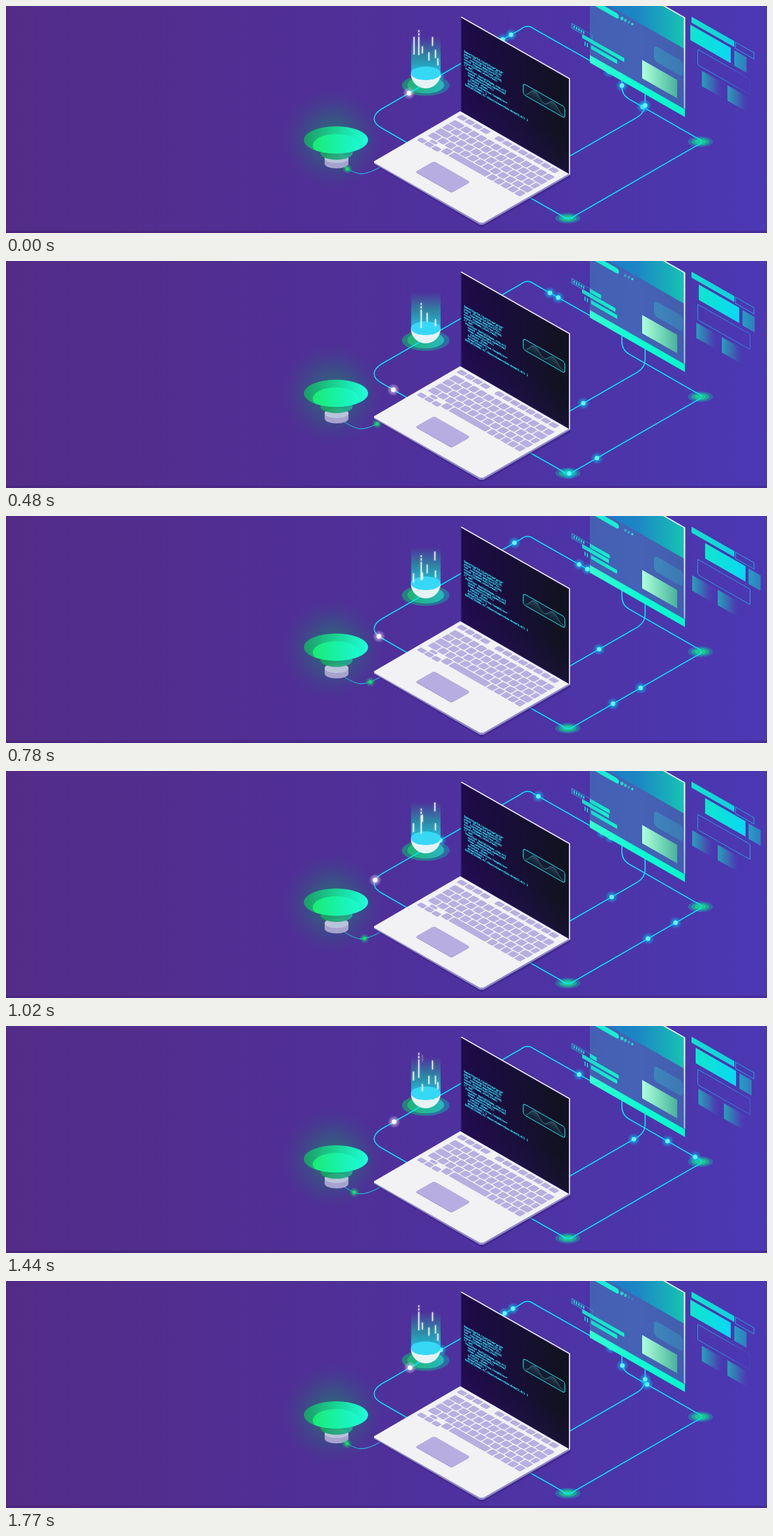
Animation of 1280 by 383 pixels, one loop 1800 ms. Source, as an HTML page with a canvas:

```html
<!DOCTYPE html>
<html lang="en">
<head>
<meta charset="utf-8">
<title>Isometric laptop</title>
<style>
  html, body { margin: 0; width: 100%; height: 100%; overflow: hidden; background: #4f309a; }
  canvas { display: block; width: 1280px; height: 383px; }
</style>
</head>
<body>
<canvas id="stage" width="1280" height="383"></canvas>
<script>
const ctx = document.getElementById('stage').getContext('2d');
const LOOP = 1800, STEP = 30, DRIFT = 1750, SLOPE = 0.573;

// ---- helpers ----
function gradient(x0, y0, x1, y1, ...colors) {
  const g = ctx.createLinearGradient(x0, y0, x1, y1);
  colors.forEach((c, i) => g.addColorStop(i / (colors.length - 1), c));
  return g;
}
function glow(x, y, r, ...colors) {
  const g = ctx.createRadialGradient(x, y, 0, x, y, r);
  colors.forEach((c, i) => g.addColorStop(i / (colors.length - 1), c));
  ctx.fillStyle = g;
  ctx.fillRect(x - r, y - r, 2 * r, 2 * r);
}
function ellipse(x, y, rx, ry, fill) {
  ctx.beginPath();
  ctx.ellipse(x, y, rx, ry, 0, 0, Math.PI * 2);
  ctx.fillStyle = fill;
  ctx.fill();
}
function polygon(fill, ...points) {
  ctx.beginPath();
  points.forEach(([x, y]) => ctx.lineTo(x, y));
  ctx.closePath();
  ctx.fillStyle = fill;
  ctx.fill();
}
function inPlane(matrix, draw) {
  ctx.save();
  ctx.transform(...matrix);
  draw();
  ctx.restore();
}
// Upright panel receding to the lower right; (x, y) is its top left corner.
function panel(x, y, w, h, { fill, stroke, r = 0, line = 1 }) {
  inPlane([1, SLOPE, 0, 1, x, y], () => {
    ctx.beginPath();
    ctx.roundRect(0, 0, w, h, r);
    if (fill) { ctx.fillStyle = Array.isArray(fill) ? gradient(0, 0, w, 0, ...fill) : fill; ctx.fill(); }
    if (stroke) {
      ctx.strokeStyle = Array.isArray(stroke) ? gradient(0, 0, w, 0, ...stroke) : stroke;
      ctx.lineWidth = line;
      ctx.stroke();
    }
  });
}

// ---- cables and the lights that run along them ----
function route(d) {
  const path = document.createElementNS('http://www.w3.org/2000/svg', 'path');
  path.setAttribute('d', d);
  return { shape: new Path2D(d), at: s => path.getPointAtLength(s) };
}
const main = route('M677 232L632 206C615 197 615 184 632 173.5L866 39Q877 30 888 38.5L1040 125');
const outer = route('M870 317L935 354Q945 363 956 354.5L1160 236.5Q1179 229 1160 221.5L1048 157Q1036 150 1036 136L1036 110');
const inner = route('M940 258L1063 187Q1075 179 1075 166L1075 130');
const wire = route('M632 270C616 280 606 283 597 283C588 283 579 278 568 271');

const CYAN = ['#62f4ff', '0,205,255'], WHITE = ['#ffffff', '240,220,255'], GREEN = ['#17d96c', '20,220,110'];
const lowLights = [
  { on: main, start: -15.5, speed: .0935, from: 0, to: 185, period: DRIFT, tint: WHITE },
  { on: main, start: 330, speed: .188, from: 195, to: 550, period: DRIFT, tint: CYAN },
  { on: main, start: 346, speed: .188, from: 195, to: 550, period: DRIFT, tint: CYAN },
  { on: main, start: 206, speed: .188, from: 195, to: 550, period: DRIFT, tint: CYAN },
  { on: wire, start: -11, speed: .042, from: 0, to: 69, period: DRIFT, tint: GREEN, size: 3 },
];
// These pass in front of the laptop's edge.
const highLights = [
  { on: outer, start: 6, speed: .283, from: 14, to: 535, period: LOOP, tint: CYAN },
  { on: outer, start: -47.5, speed: .283, from: 14, to: 535, period: LOOP, tint: CYAN },
  { on: inner, start: -13, speed: .102, from: 9, to: 200, period: DRIFT, tint: CYAN },
];
function drawLights(lights, t) {
  for (const { on, start, speed, from, to, period, tint, size = 3.8 } of lights) {
    for (const lap of [-1, 0, 1]) {
      const s = start + speed * (t + lap * period);
      if (s < from || s > to) continue;
      const p = on.at(s), [core, rgb] = tint;
      glow(p.x, p.y, size * 2.8, `rgba(${rgb},.9)`, `rgba(${rgb},.45)`, `rgba(${rgb},0)`);
      ellipse(p.x, p.y, size, size, core);
    }
  }
}
function drawCables() {
  ctx.strokeStyle = '#08e8ff';
  ctx.lineWidth = 1.7;
  [main, outer, inner].forEach(r => ctx.stroke(r.shape));
  ctx.strokeStyle = '#1fc4e4';
  ctx.lineWidth = 1.3;
  ctx.stroke(wire.shape);
}

// ---- scenery ----
function drawBackground() {
  ctx.fillStyle = gradient(0, 0, 1280, 0, '#532c87', '#4f309a', '#4b38b3');
  ctx.fillRect(0, 0, 1280, 383);
  ctx.fillStyle = 'rgba(60,30,110,.35)';
  ctx.fillRect(0, 379, 1280, 4);
}
function drawPad(x, y) {
  ellipse(x, y, 21, 9, 'rgba(35,150,175,.5)');
  ellipse(x, y, 15, 6.5, 'rgba(25,200,145,.6)');
  ellipse(x, y, 9.5, 4.2, 'rgba(25,225,135,.65)');
}
function drawHorn(sway) {
  const dy = 2.5 * sway - 2.5;
  glow(550, 224, 86, 'rgba(20,150,100,.7)', 'rgba(30,125,110,.36)', 'rgba(50,80,135,0)');
  ctx.beginPath();
  ctx.ellipse(556, 257, 20, 8, 0, Math.PI, 0);
  ctx.ellipse(556, 266, 20, 8, 0, 0, Math.PI);
  ctx.fillStyle = '#a6a3ce';
  ctx.fill();
  ellipse(556, 257, 20, 8, '#b9c3d9');
  ellipse(556, 248 + dy, 27, 11.5, gradient(529, 0, 583, 0, 'rgba(25,160,90,.95)', 'rgba(35,175,150,.9)'));
  ellipse(555, 226 + dy, 54, 23, gradient(501, 0, 609, 0, '#1c9c68', '#19d492', '#1effdc'));
  ctx.save();
  ctx.beginPath();
  ctx.ellipse(555, 226 + dy, 54, 23, 0, 0, Math.PI * 2);
  ctx.clip();
  ellipse(555, 235 + dy, 39, 19, gradient(516, 0, 594, 0, '#1bea74', '#18f2a2', 'rgba(28,255,215,.6)'));
  ctx.restore();
}

// x, length, start time, start y, end time, end y
const streaks = [
  [694, 42, 1290, 48, 2140, 38], [700, 12, 1400, 102, 2120, 52], [700, 12, 680, 106, 1500, 46],
  [686, 30, 1770, 53, 2200, 43], [685, 15, 700, 100, 1720, 72], [698, 42, 420, 72, 1330, 61],
  [708, 15, 190, 95, 1000, 79], [711, 14, 1400, 85, 2180, 74], [717, 15, 1360, 60, 2120, 49],
  [721, 15, 690, 63, 1310, 48], [722, 12, 440, 99, 1330, 85], [722, 14, 1380, 86, 2250, 66],
  [726, 12, 1380, 96, 2100, 85],
];
function drawStreaks(t) {
  ctx.fillStyle = '#fff';
  ctx.shadowColor = 'rgba(230,245,255,.8)';
  ctx.shadowBlur = 3;
  for (const [x, len, t0, y0, t1, y1] of streaks) {
    const now = t < t0 ? t + LOOP : t;
    if (now < t0 || now > t1) continue;
    const u = (now - t0) / (t1 - t0), y = y0 + (y1 - y0) * u * (3 - u) / 2;
    ctx.globalAlpha = Math.min(1, (now - t0) / 30, (t1 - now) / 250);
    if (len > 40) {
      ctx.fillRect(x - .4, y, 1.6, 3);
      ctx.fillRect(x - .4, y + 5, 1.6, 4);
      ctx.fillRect(x - .4, y + 11, 1.6, len - 11);
    } else ctx.fillRect(x - .4, y, 1.6, len);
  }
  ctx.globalAlpha = 1;
  ctx.shadowBlur = 0;
}
function drawBowlPad() {
  ellipse(706, 134, 40, 17.5, gradient(666, 0, 746, 0, 'rgba(30,150,120,.8)', 'rgba(40,120,170,.8)'));
  ellipse(706, 133.5, 31, 14, gradient(675, 0, 737, 0, '#20b472', '#28b8c0'));
}
function drawBowl(t) {
  ctx.beginPath();
  ctx.arc(706, 114, 25, 0, Math.PI);
  ctx.fillStyle = '#e6f3f5';
  ctx.fill();
  ctx.fillStyle = gradient(0, 52, 0, 115, 'rgba(40,150,165,0)', 'rgba(35,160,165,.75)', '#22c4e2');
  ctx.fillRect(681.5, 52, 49.5, 63);
  ellipse(706, 113.5, 25, 11.5, '#36d8f6');
  drawStreaks(t);
}

const code = [
  [0, 'import{grid,list}from"grid"'], [0, 'const_size=grid.make(12,8)'], [0, 'let_row=size.map(i=>i*2);'],
  [0, 'const_items=list(row,size)'], [0, 'export{items,size,row};'], [0, '//_set'],
  [1, 'function_build(items,row,n){'], [3, 'const_view=items.open(row)'], [3, 'view.each(i=>i+1);'],
  [5, 'return_view;'], [3, 'if(view.size>row.length)n++'], [3, 'draw(view); }'],
  [1, 'build(items,4).then(view=>view.draw(2,8)) }'],
].map(([indent, text]) => [indent, text.replaceAll('_', ' ')]);
function drawScreen() {
  polygon('#2a1a63', [765, 18], [948, 122], [948, 284], [765, 178]);
  polygon(gradient(768, 160, 948, 150, '#1f0a4b', '#170f36', '#10131c'), [767, 21], [946, 124], [946, 281], [767, 178]);
  polygon(gradient(800, 200, 830, 150, 'rgba(50,25,110,.22)', 'rgba(40,15,100,0)'), [767, 130], [946, 232], [946, 281], [767, 178]);
  ctx.strokeStyle = '#f3f1fb';
  ctx.lineWidth = 1.8;
  ctx.beginPath();
  ctx.moveTo(765.5, 18.5);
  ctx.lineTo(947.8, 122.5);
  ctx.lineTo(947.8, 284);
  ctx.stroke();

  inPlane([1, SLOPE, 0, 1, 766, 18], () => {
    ctx.font = 'bold 4.1px "DejaVu Sans Mono", monospace';
    ctx.fillStyle = ctx.strokeStyle = '#2ed3ea';
    ctx.lineWidth = .35;
    code.forEach(([indent, text], i) => {
      ctx.fillText(text, 4 + indent * 2.2, 57 + i * 4.6);
      ctx.strokeText(text, 4 + indent * 2.2, 57 + i * 4.6);
    });
    ctx.beginPath();
    ctx.roundRect(104, 53, 70, 18.5, 4);
    ctx.fillStyle = 'rgba(20,40,60,.5)';
    ctx.fill();
    ctx.strokeStyle = '#22e0e6';
    ctx.lineWidth = 1.2;
    ctx.stroke();
    ctx.beginPath();
    ctx.moveTo(108, 68.5);
    ctx.bezierCurveTo(115, 68, 116, 55, 123, 55);
    ctx.bezierCurveTo(130, 55, 132, 67, 140, 66.5);
    ctx.bezierCurveTo(146, 66, 147, 56, 154, 56);
    ctx.bezierCurveTo(161, 56, 163, 68, 171, 68.5);
    ctx.fillStyle = gradient(0, 54, 0, 69, 'rgba(55,100,120,.75)', 'rgba(25,45,60,.3)');
    ctx.fill();
    ctx.strokeStyle = '#427f90';
    ctx.lineWidth = .8;
    ctx.stroke();
  });
}
function drawBase() {
  polygon('rgba(45,25,110,.35)', [619, 268], [800, 374], [950, 289], [948, 280]);
  polygon('#8f88c9', [619, 263], [619, 266], [797, 369], [803, 369], [949, 285], [948, 280]);
  polygon('#f2f2f4', [619, 262], [763, 178], [768, 177], [948, 281], [947, 283], [803, 365.5], [797, 365.5], [619, 264]);

  // Keyboard plane: first axis along the hinge, second towards the user.
  inPlane([1, SLOPE, -1, SLOPE, 766, 177], () => {
    ctx.fillStyle = '#b8afe1';
    ctx.beginPath();
    const key = (u, v, w, h) => ctx.roundRect(u, v, w, h, 1.6);
    for (let i = 0; i < 13; i++) if (i !== 4) key(5 + i * 13 - (i > 4 ? 2 : 0), 5.5, 11.4, 8);
    for (let row = 0; row < 4; row++) {
      const v = 18.6 + row * 12, first = [17, 12, 20, 14][row];
      key(8, v, first, 10.5);
      for (let u = 8 + first + 1.6; u < 174;) {
        const w = u > 156 ? 176 - u : 11;
        key(u, v, w, 10.5);
        u += w + 1.6;
      }
    }
    key(42, 66.6, 11, 10.5);
    key(55, 66.6, 62, 10.5);
    for (let i = 0; i < 5; i++) key(119 + i * 11.6, 66.6, 10, 10.5);
    for (let i = 0; i < 3; i++) key(5 + i * 12.2, 73, 10.6, 7.5);
    key(17.2, 66.6, 10.6, 5);
    ctx.fill();
    ctx.beginPath();
    ctx.roundRect(51.4, 98, 61, 31, 3);
    ctx.fillStyle = '#9f95d3';
    ctx.fill();
    ctx.beginPath();
    ctx.roundRect(51, 97, 61, 31, 3);
    ctx.fillStyle = '#b7ade1';
    ctx.fill();
  });
}

function drawMonitor(t) {
  panel(982, -72, 160, 167, { fill: ['#4560b2', '#4562b6', '#425fae'] });
  panel(982, -72, 160, 53, { fill: ['#1c78c8', '#1c86c4', '#16c4b4'] });
  panel(982, 82.8, 160, 12.7, { fill: ['#35ffd0', '#0cffd2', '#08f5cc'] });
  polygon(gradient(0, 20, 0, 175, '#e8fbff', '#8fb6dc'), [1140, 19], [1142.5, 20], [1142.5, 174], [1140, 172]);
  ctx.strokeStyle = '#dff8ff';
  ctx.lineWidth = 2;
  ctx.beginPath();
  ctx.moveTo(1100, -4);
  ctx.lineTo(1142, 20);
  ctx.stroke();
  panel(975, -18, 56, 9, { fill: ['#22e8d0', '#14f2d4'], r: 4.5 });

  const dim = t > 10 && t < 400 || t > 1760, away = t > 400 && t < 1000;
  [away ? 0 : .95, away ? .45 : .75, dim ? .25 : .5, dim ? .25 : 1].forEach((alpha, i) => {
    ctx.globalAlpha = alpha;
    ellipse(1036 + i * 5.8, 21 + i * 3.2, 2.6 - i * .2, 2.9 - i * .25, '#1ee6d2');
  });
  ctx.globalAlpha = 1;
  panel(1090, 66, 49, 26, { fill: ['rgba(60,150,190,.7)', 'rgba(55,140,185,.55)'], r: 6 });
  panel(1070, 91, 59, 31, { fill: ['#b0ffdc', '#78dcba', '#4ab09c'] });
}

function drawCodeBars(sway) {
  panel(952, 29.5, 34, 8, { stroke: ['rgba(25,225,225,.9)', 'rgba(25,200,220,.45)'] });
  for (let i = 0; i < 5; i++) panel(954.5 + i * 4, 32.5 + i * 2.3, 2.2, 4.5, { fill: '#18e4dc' });
  const teal = ['#14dccb', '#10f2cc'];
  panel(982, 46.5, Math.max(0, 17 - 18 * sway), 6.5, { fill: teal, r: 1 });
  panel(969, 47.5, 57.5 + 13.5 * sway, 6.5, { fill: teal, r: 1 });
  panel(984, 66, 44, 6.5, { fill: teal, r: 1 });
  panel(973, 59.5, 2, 7, { fill: '#18c8d4' });
  panel(977, 62, 2, 7, { fill: '#18c8d4' });
}
function drawFloatingPanels(sway) {
  // Each panel slides along its own receding edge.
  const slide = (x, y, shift, w, h, style) => panel(x + shift, y + shift * SLOPE, w, h, style);
  slide(1164, 39, -13 * sway, 68, 26, { fill: ['#10e6cc', '#08d8f4'] });
  slide(1237.5, 82, -12.5 * sway, 20.5, 26, { fill: ['rgba(30,170,200,.9)', 'rgba(40,150,190,.75)'] });
  panel(1153, 18, 72, 10, { fill: ['#12e2cc', '#10cfe0'] });
  panel(1227, 61, 31, 10.5, { stroke: 'rgba(20,205,235,.85)' });
  const far = (.5 - .4 * sway).toFixed(2);
  panel(1163.5, 73, 88, 26, { stroke: ['rgba(20,205,235,.8)', 'rgba(20,205,235,.7)', `rgba(20,205,235,${far})`], r: 2 });
  const fade = ['rgba(35,175,185,.9)', 'rgba(50,135,185,.6)', 'rgba(70,80,180,0)'];
  slide(1162, 104.5, 8.5 * sway, 36, 26, { fill: fade });
  slide(1205, 129, 8.5 * sway, 36, 26, { fill: fade });
}

function draw(t) {
  const sway = Math.cos(2 * Math.PI * t / LOOP);
  drawBackground();
  drawPad(1168, 229);
  drawPad(945, 358);
  drawBowlPad();
  drawCables();
  drawHorn(sway);
  drawLights(lowLights, t);
  drawBowl(t);
  drawBase();
  drawScreen();
  drawLights(highLights, t);
  drawMonitor(t);
  drawCodeBars(sway);
  drawFloatingPanels(sway);
}

let shown = -1;
function tick() {
  const t = Math.floor(performance.now() % LOOP / STEP) * STEP;
  if (t !== shown) draw(shown = t);
  requestAnimationFrame(tick);
}
tick();
</script>
</body>
</html>
```
